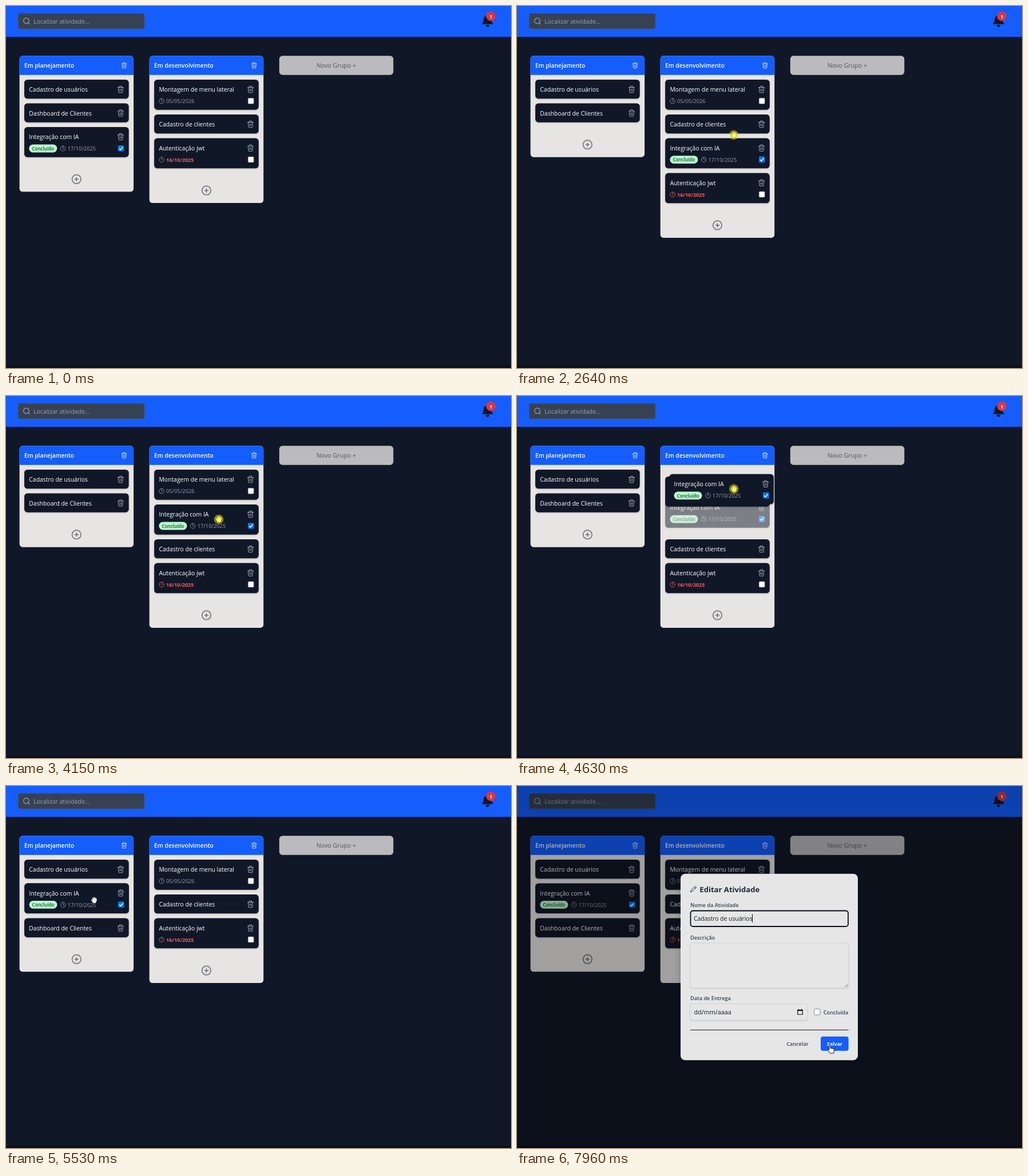
These frames come from a looping animation (883 by 634 pixels, 8 s). An HTML page:

```html
<!DOCTYPE html>
<html lang="pt-BR">
<head>
<meta charset="utf-8">
<title>Quadro de atividades</title>
<style>
  html, body { margin: 0; width: 100%; height: 100%; overflow: hidden; background: #101828; }
  svg { display: block; width: 883px; height: 634px; font-family: "Open Sans", "Noto Sans", sans-serif; }
  .card > rect:first-child { filter: drop-shadow(0 1px 1px rgba(0, 0, 0, .22)); }
  #dashboard { transform-origin: 91.4px 16.7px; }
  #modal > .panel { filter: drop-shadow(0 3px 6px rgba(0, 0, 0, .25)); }
  .field { fill: #e6e6e7; stroke: #d3d4d8; filter: drop-shadow(0 1px 1px rgba(0, 0, 0, .12)); }
</style>
</head>
<body>
<svg id="stage" viewBox="0 0 883 634" xmlns="http://www.w3.org/2000/svg"></svg>
<script>
const LOOP = 8000;
const BLUE = '#155dfc', NIGHT = '#101828', MUTED = '#99a1af', LABEL = '#364153';
const CARD_W = 182.7, SHORT = 33.3, TALL = 52.7;

const ICON = {
  trash: 'M3 6h18M19 6l-1 14a2 2 0 0 1-2 2H8a2 2 0 0 1-2-2L5 6M8 6V4a2 2 0 0 1 2-2h4a2 2 0 0 1 2 2v2M10 11v6M14 11v6',
  clock: 'M12 2a10 10 0 1 0 .01 0zM12 6v6l4 2',
  plus: 'M12 2a10 10 0 1 0 .01 0zM12 8v8M8 12h8',
  search: 'M11 3a8 8 0 1 0 .01 0zM21 21l-4.3-4.3',
  pencil: 'M17 3a2.8 2.8 0 0 1 4 4L7.5 20.5 2 22l1.5-5.5zM15 5l4 4',
  bell: 'M12 2a7 7 0 0 0-7 7c0 6-3 8-3 9h20c0-1-3-3-3-9a7 7 0 0 0-7-7zM9 20.5a3 3 0 0 0 6 0z'
};

// Markup helpers; text and icons are placed by their vertical centre.
const text = (x, cy, str, size, fill, weight = 400, anchor = 'start') =>
  `<text x="${x}" y="${cy + size * .4}" font-size="${size}" fill="${fill}" font-weight="${weight}" text-anchor="${anchor}">${str}</text>`;
const rect = (x, y, w, h, r, fill, extra = '') =>
  `<rect x="${x}" y="${y}" width="${w}" height="${h}" rx="${r}" fill="${fill}" ${extra}/>`;
const icon = (name, cx, cy, size, stroke, width = 2, fill = 'none') =>
  `<path d="${ICON[name]}" transform="translate(${cx - size / 2} ${cy - size / 2}) scale(${size / 24})" fill="${fill}" stroke="${stroke}" stroke-width="${width}" stroke-linecap="round" stroke-linejoin="round"/>`;

function checkbox(checked) {
  return checked
    ? rect(163.8, 32, 10.6, 10.6, 1.8, '#0075ff') +
      '<path d="M166 37.5l2.3 2.4 4-5" fill="none" stroke="#fff" stroke-width="1.6"/>'
    : rect(164.1, 32.3, 10, 10, 1.5, '#fff', 'stroke="#767676" stroke-width=".6"');
}

function card(id, title, { date, done, late } = {}) {
  let body = rect(0, 0, CARD_W, date ? TALL : SHORT, 5.5, NIGHT) +
    text(8.3, 17, title, 10.4, '#fff') + icon('trash', 168.4, 17, 13.6, MUTED, 1.9);
  if (date) {
    const x = done ? 67.6 : 13, color = late ? '#ff5a5f' : MUTED;
    if (done) body += rect(8.3, 30.6, 49, 13.8, 6.9, '#b9f8cf') + text(32.8, 37.6, 'Concluído', 8.1, '#0d542b', 600, 'middle');
    body += icon('clock', x, 37.5, 10.4, color) +
      text(x + 8, 37.5, date, late ? 8.95 : 9.35, color, late ? 700 : 400) + checkbox(done);
  }
  return `<g class="card" id="${id}">${body}</g>`;
}

const column = (id, x, title) =>
  rect(x, 87.3, 199.5, 238, 5.5, '#e7e5e4', `id="${id}"`) +
  `<path d="M${x} 120.7V92.8a5.5 5.5 0 0 1 5.5-5.5h188.5a5.5 5.5 0 0 1 5.5 5.5v27.9z" fill="${BLUE}"/>` +
  text(x + 8.3, 104, title, 10.3, '#fff', 600) + icon('trash', x + 183, 104, 12, '#d5e1fb', 1.9) +
  `<g id="${id}Plus">${icon('plus', x + 99.7, 0, 18.4, '#62666e', 1.9)}</g>`;

const board =
  rect(0, 0, 883, 634, 0, NIGHT) + rect(0, 630, 883, 4, 0, '#0a0f1e') + rect(0, 0, 883, 54, 0, BLUE) +
  rect(21.2, 12.9, 220.8, 27, 3.5, LABEL, 'stroke="#4a5565" stroke-width=".8"') +
  icon('search', 36, 26.5, 14.5, MUTED) + text(48.3, 26.8, 'Localizar atividade...', 10.4, MUTED) +
  icon('bell', 842, 25.8, 22, NIGHT, 1, NIGHT) +
  '<circle cx="847.7" cy="18" r="8.3" fill="#dc3545"/>' + text(847.7, 18, '1', 9, '#fff', 700, 'middle') +
  column('plan', 23.6, 'Em planejamento') + column('dev', 250.7, 'Em desenvolvimento') +
  rect(477.8, 87.3, 199.5, 33.4, 5.5, '#bbbbbd') + text(577.4, 104, 'Novo Grupo +', 10.7, '#54575d', 400, 'middle');

const integration = { date: '17/10/2025', done: true };
const cards =
  card('users', 'Cadastro de usuários') +
  card('dashboard', 'Dashboard de Clientes') +
  card('integ', 'Integração com IA', integration) +
  card('clients', 'Cadastro de clientes') +
  card('menu', 'Montagem de menu lateral', { date: '05/05/2026' }) +
  card('auth', 'Autenticação jwt', { date: '16/10/2025', late: true }) +
  card('lifted', 'Integração com IA', integration);

const modal = '<g id="modal">' +
  rect(0, 0, 883, 634, 0, '#000', 'opacity=".3"') +
  rect(286, 153.8, 310, 326.4, 8, '#e6e6e7', 'class="panel"') +
  icon('pencil', 308.3, 180.8, 12, '#1e2939') + text(319.3, 181, 'Editar Atividade', 13.1, '#1e2939', 700) +
  text(303, 208, 'Nome da Atividade', 9.2, LABEL, 600) +
  rect(303.5, 218.5, 275.5, 27.5, 4, 'none', 'stroke="#0b0d12" stroke-width="1.8"') +
  text(309, 232.3, 'Cadastro de usuários', 10.4, '#15181e') +
  rect(411, 224.5, 1, 14.5, 0, '#000', 'id="caret"') +
  text(303, 265, 'Descrição', 9.2, LABEL, 600) +
  rect(303, 275, 276.5, 78.5, 3.5, '', 'class="field"') +
  '<path d="M573 352l5-5M576 352l2-2" stroke="#555" stroke-width=".8"/>' +
  text(303, 371.5, 'Data de Entrega', 9.2, LABEL, 600) +
  rect(303, 381.5, 205, 28.5, 3.5, '', 'class="field"') +
  text(309.5, 396, 'dd/mm/aaaa', 10.8, '#15181e') +
  '<path d="M490.7 392.4h8.6v7.6h-8.6zM492.5 390.5v2M497.5 390.5v2M490.7 393.3h8.6" fill="none" stroke="#111" stroke-width="1.2"/>' +
  rect(519.7, 390.5, 10.4, 10.4, 1.8, '#fff', 'stroke="#767676" stroke-width=".9"') +
  text(535.8, 396, 'Concluída', 9.15, LABEL, 600) +
  rect(303, 426.8, 276.7, 1, 0, '#15181e') +
  text(471.3, 451.3, 'Cancelar', 9.1, LABEL, 600) +
  rect(531, 438.7, 48.7, 25, 4, BLUE) + text(555.4, 451.3, 'Salvar', 8.9, '#fff', 700, 'middle') + '</g>';

const HAND = 'M-5-1L-2 4M-2.6-4.5L-1 3M.3-5.6V3M3-4.6L2 3M5-2L3.3 4M-1.6 3.6L0 5H2L3.2 3.4z';
const outlined = (id, d) => `<path id="${id}" d="${d}" fill="#fff" stroke="#000" stroke-width=".9" stroke-linejoin="round"/>`;
const cursor = '<g id="cursor">' +
  outlined('arrow', 'M-6.5-7V6l3-2.8 2.3 5 2-.9-2.3-4.9H3z') +
  outlined('pointer', 'M-3-7.5q1.3-1 2.2.3V-2l4.6 1q1.8.5 1.7 2.2L4.8 7H-1.6L-5.4 1.6q-.6-1.3.6-1.6L-3 1z') +
  `<g id="hand" fill="none" stroke-linecap="round" stroke-linejoin="round"><g transform="scale(.85)">
    <path d="${HAND}" stroke="#000" stroke-width="3.6"/><path d="${HAND}" stroke="#fff" stroke-width="2.1"/></g></g>` +
  '<circle id="press" r="8.3" fill="#fff000" opacity=".5"/></g>';

document.getElementById('stage').innerHTML = board + cards + modal + cursor;

// Each stop is [ms, value, easing towards the next stop]; without easing the value holds.
function play(id, prop, stops) {
  const frames = stops.map(([ms, value, easing = 'step-end']) => ({ offset: ms / LOOP, [prop]: value, easing }));
  frames.push({ offset: 1, [prop]: stops.at(-1)[1] });
  document.getElementById(id).animate(frames, { duration: LOOP, iterations: Infinity });
}
const move = (id, ...stops) => play(id, 'transform',
  stops.map(([ms, x, y, easing, sy = 1]) => [ms, `translate(${x}px, ${y}px) scale(1, ${sy})`, easing]));
const show = (id, on, off, ...times) => play(id, 'opacity',
  [[0, off], ...times.map((ms, i) => [ms, i % 2 ? off : on])]);

const L = 'linear', E = 'ease', IO = 'ease-in-out';
const X1 = 32, X2 = 259.1;
const DROP1 = 1960, DROP3 = 5400;

move('users', [0, X1, 129]);
move('dashboard', [0, X1, 170.4], [5130, X1, 170.4, E], [5330, X2, 129, undefined, TALL / SHORT], [DROP3, X1, 231.6]);
move('integ', [0, X1, 212], [DROP1, X2, 231.6], [2740, X2, 231.6, E], [2940, X2, 190],
  [4600, X2, 190, E], [4800, X2, 129], [5110, X2, 129, E], [5310, X2, 190], [DROP3, X1, 170.4]);
move('clients', [0, X2, 190], [2740, X2, 190, E], [2940, X2, 251], [DROP3, X2, 190]);
move('menu', [0, X2, 129], [4600, X2, 129, E], [4800, X2, 190], [5110, X2, 190, E], [5310, X2, 129]);
move('auth', [0, X2, 231.6], [1670, X2, 231.6, E], [1870, X1, 212], [DROP1, X2, 292.6], [DROP3, X2, 231.6]);
move('lifted', [0, X1, 212], [1270, X1, 212, IO], [1720, 246, 276, L], [DROP1, 262, 235, E], [2090, X2, 231.6],
  [2650, X2, 225, L], [2860, 266, 186, L], [2930, 266, 184, E], [3050, X2, 190],
  [4300, X2, 190, L], [4550, 274, 144, L], [4800, 250, 122, L], [5040, 227, 146, L],
  [5180, 90, 182, 'ease-out'], [DROP3, 60, 166, E], [5550, X1, 170.4]);
show('integ', .5, 1, 1300, 2090, 2650, 3050, 4300, 5550);
show('lifted', 1, 0, 1300, 2090, 2650, 3050, 4300, 5550);

function resize(id, normal, changed) {
  play(id, 'height', [[0, normal], [DROP1, changed], [DROP3, normal]].map(([ms, h]) => [ms, h + 'px']));
  move(id + 'Plus', [0, 0, normal + 65.3], [DROP1, 0, changed + 65.3], [DROP3, 0, normal + 65.3]);
}
resize('plan', 238, 177.4);
resize('dev', 257.7, 318.6);

move('cursor', [0, 842, 612], [140, 842, 612, IO], [890, 118, 147, IO], [1160, 119, 242], [1260, 119, 242, IO],
  [1720, 333, 306, L], [DROP1, 349, 265, IO], [2480, 379, 246], [2580, 379, 246, L], [2640, 379, 226, L],
  [2860, 386, 195], [2950, 386, 195, IO], [3400, 605, 103], [3490, 605, 103, IO], [4050, 372, 216],
  [4290, 372, 216, L], [4550, 387, 170, L], [4800, 363, 148, L], [5040, 320, 175, L],
  [5180, 184, 216, 'ease-out'], [DROP3, 154, 200], [5600, 154, 200, IO], [6480, 201.5, 153],
  [6740, 209, 156, IO], [7540, 322, 303, IO], [7900, 549, 461]);

show('arrow', 1, 0, 140, 820, 3080, 3900, 6710, 7820);
show('hand', 1, 0, 820, 3080, 3900, 6710);
show('pointer', 1, 0, 7820);
show('press', .5, 0, 1230, DROP1, 2570, 2930, 4080, DROP3);
show('modal', 1, 0, 6710);
show('caret', 1, 0, 6710, 7210, 7710);
</script>
</body>
</html>
```
